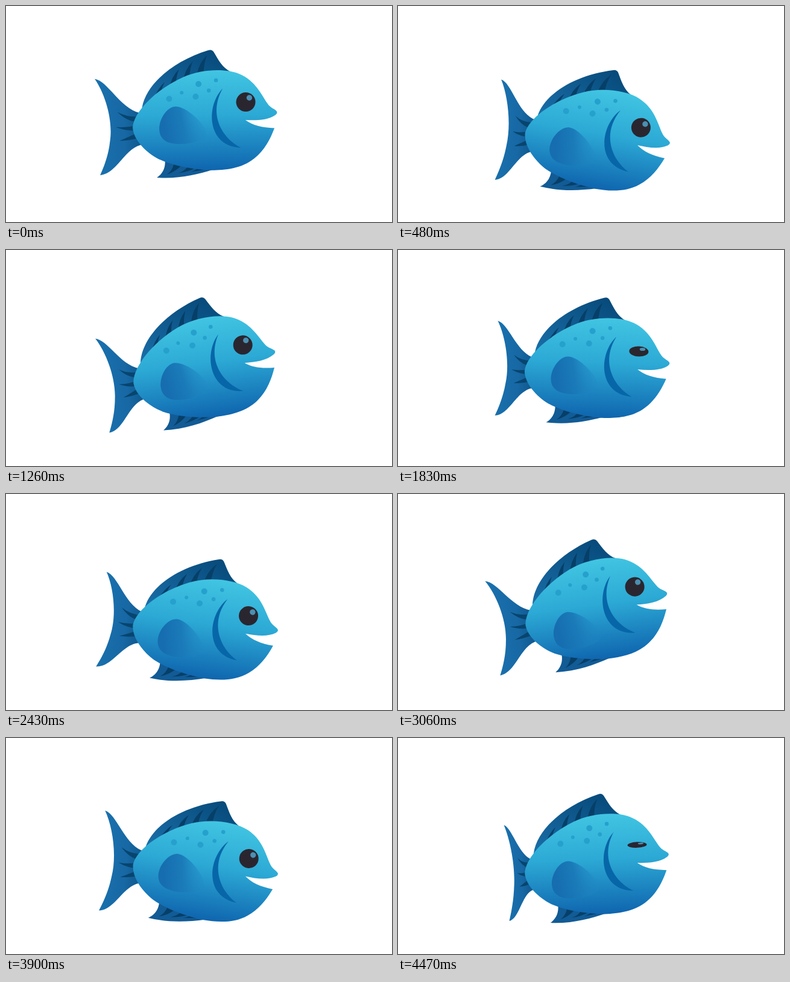
An HTML page for the animation above (4500 ms loop, 640 px wide and 360 px high).

```html
<!DOCTYPE html>
<html lang="en">
<head>
<meta charset="utf-8">
<title>Swimming fish</title>
<style>
  html, body { margin: 0; width: 100%; height: 100%; overflow: hidden; background: #fff; }
  svg { display: block; width: 100%; height: 100%; }
</style>
</head>
<body>
<svg viewBox="0 0 640 360">
  <defs>
    <linearGradient id="skin" x1="0" y1="0" x2="0" y2="1">
      <stop offset="0" stop-color="#41c5e2"/>
      <stop offset=".45" stop-color="#2ca9d5"/>
      <stop offset="1" stop-color="#0f65ae"/>
    </linearGradient>
    <linearGradient id="back" x1="0" y1="1" x2=".8" y2="0">
      <stop offset="0" stop-color="#1b70ab"/>
      <stop offset="1" stop-color="#074a7a"/>
    </linearGradient>
    <linearGradient id="tailFill">
      <stop offset="0" stop-color="#1971ae"/>
      <stop offset=".5" stop-color="#1768a4"/>
      <stop offset="1" stop-color="#0b4d80"/>
    </linearGradient>
    <linearGradient id="finFill" x1=".1" y1=".6" x2="1" y2=".5">
      <stop offset="0" stop-color="#166daf"/>
      <stop offset=".45" stop-color="#1a79b8" stop-opacity=".95"/>
      <stop offset="1" stop-color="#2089c4" stop-opacity=".15"/>
    </linearGradient>
  </defs>
  <g id="fish">
    <g id="tail">
      <path fill="url(#tailFill)" d="M148 120C170 124 188 168 222 178L244 180V230L228 230C195 235 185 278 155 281C160 270 169 250 172 225C178 190 165 145 148 120Z"/>
      <path fill="#07456f" d="M185 176Q200 185 222 184V194Q200 192 185 176ZM182 201Q200 203 222 197V207Q200 209 182 201ZM188 224Q203 218 222 209V219Q205 224 188 224Z"/>
    </g>
    <path fill="url(#back)" d="M226 169C233 130 279 92 337 75Q343 73 346 78C354 92 360 104 373 111L330 135L226 177Z"/>
    <path fill="#063f68" d="M245 155Q253 137 264 127Q257 140 257 150ZM271 139Q275 118 288 106Q282 120 283 134ZM294 127Q298 105 311 93Q304 110 306 124ZM317 119Q320 97 335 83Q328 99 329 117Z"/>
    <path fill="#125b95" d="M262 251C266 270 257 281 249 286C285 289 315 282 342 274L300 252Z"/>
    <path fill="#063f68" d="M266 281Q275 275 278 262L290 266Q281 276 266 281ZM285 279Q297 275 302 266L314 270Q302 277 285 279ZM306 277Q316 274 320 268L333 273Z"/>
    <path fill="url(#skin)" d="M210 202C212 176 249 139 295 119C325 106 366 105 388 115C415 127 424 150 434 165C439 173 446 174 449 178Q451 181 447 184C434 193 415 193 397 192C409 201 424 205 445 206C438 224 428 243 411 256C390 273 362 275 340 275C305 273 275 266 252 255C232 244 211 223 210 202Z"/>
    <g fill="#26a0cd">
      <circle cx="271" cy="155" r="5"/><circle cx="292" cy="145" r="3"/>
      <circle cx="320" cy="131" r="5"/><circle cx="349" cy="125" r="3.3"/>
      <circle cx="315" cy="152" r="5"/><circle cx="337" cy="142" r="3.3"/>
    </g>
    <path fill="#0766a8" d="M360 139C331 168 333 236 389 238C358 222 335 182 360 139Z"/>
    <path id="fin" fill="url(#finFill)" d="M254 205C254 190 266 169 281 168C296 168 319 187 329 204Q334 212 330 220C318 229 290 234 270 228Q254 222 254 205Z"/>
    <g id="eye">
      <circle r="16" fill="#2a2630"/>
      <circle cx="6" cy="-7" r="4.7" fill="#4b8fb2"/>
    </g>
  </g>
</svg>
<script>
const LOOP = 4500, STEP = 30, SWIM = 1725;
const part = id => document.getElementById(id);
const [fish, tail, fin, eye] = ['fish', 'tail', 'fin', 'eye'].map(part);

// Smooth swing from lo (at start) to hi (after rise ms) and back.
function swing(t, start, rise, lo, hi) {
  const u = ((t - start) % SWIM + SWIM) % SWIM;
  const v = u < rise ? u / rise : 1 + (u - rise) / (SWIM - rise);
  return lo + (hi - lo) * (1 - Math.cos(Math.PI * v)) / 2;
}

// Beat phase in radians, linear between [ms, degrees] keys.
function phase(t, keys) {
  let i = 1;
  while (i < keys.length - 1 && keys[i][0] < t) i++;
  const [t0, a0] = keys[i - 1], [t1, a1] = keys[i];
  return (a0 + (a1 - a0) * (t - t0) / (t1 - t0)) * Math.PI / 180;
}
const tailBeat = [[0, 23], [480, 276], [1260, 779], [1830, 1157], [3060, 1846], [3900, 2461], [4320, 2635], [4470, 2664]];
const finBeat = [[0, 0], [480, 256], [1260, 802], [1830, 1150], [3060, 1980], [3900, 2462], [4470, 2645]];

function blink(t) {
  const away = Math.min(Math.abs(t - 1878), Math.abs(t - 4492));
  return Math.min(1, .1 + .9 * away / 100);
}

function pose(part, value) { part.setAttribute('transform', value); }

function draw(now) {
  const t = Math.floor(now % LOOP / STEP) * STEP;
  const y = swing(t, 1595, 770, -3.3, 31);
  const tilt = swing(t, 1312, 945, -7.6, 9.5);
  pose(fish, `translate(0 ${y}) rotate(${tilt} 320 198)`);

  const beat = phase(t, tailBeat);
  const width = .77 + .25 * Math.cos(beat);
  const height = 1.01 - .03 * Math.sin(beat);
  const turn = 2.8 * Math.sin(beat) - 1.1;
  pose(tail, `translate(217 203) rotate(${turn}) scale(${width} ${height}) translate(-217 -203)`);

  pose(fin, `translate(0 ${10.5 - 10.5 * Math.cos(phase(t, finBeat))})`);
  pose(eye, `translate(398 162) scale(1 ${blink(t)})`);
}

const begin = performance.now();
function tick() {
  draw(performance.now() - begin);
  requestAnimationFrame(tick);
}
tick();
</script>
</body>
</html>
```
